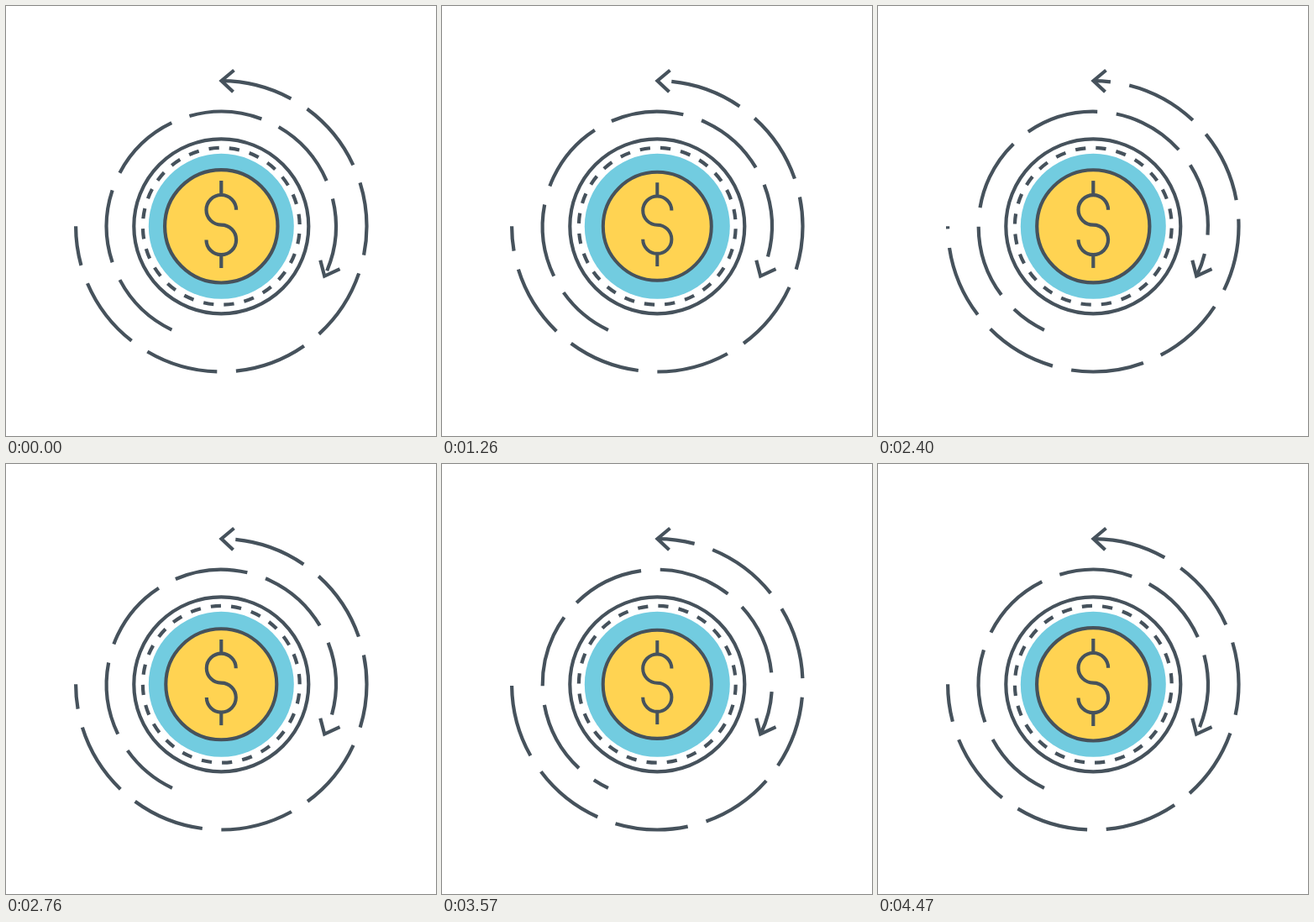
An HTML page with a canvas that plays this animation: 512 px wide and 512 px high, repeating every 4500 ms.

```html
<!DOCTYPE html>
<html lang="en">
<head>
<meta charset="utf-8">
<title>Coin circulation</title>
<style>
  html, body { margin: 0; width: 100%; height: 100%; overflow: hidden; background: #fff; }
  canvas { display: block; width: 100vmin; height: 100vmin; }
</style>
</head>
<body>
<canvas id="stage" width="512" height="512"></canvas>
<script>
const ctx = document.getElementById('stage').getContext('2d');
const LOOP = 4500, STEP = 30, TAU = Math.PI * 2;
const CX = 256.3, CY = 262.3;
const INK = '#46525c', BLUE = '#72cce0', YELLOW = '#ffd352';
const DASH = 87.2, PERIOD = 109.9, ARC_CYCLES = 3;
const RING_RADIUS = 93.4, RING_TICKS = 24, RING_CYCLES = 8;
const rad = degrees => degrees * Math.PI / 180;

function circle(radius, fill, stroked) {
  ctx.beginPath();
  ctx.arc(CX, CY, radius, 0, TAU);
  if (fill) { ctx.fillStyle = fill; ctx.fill(); }
  if (stroked) ctx.stroke();
}

function dashedArc(radius, from, to, reverse, dash, period, shift) {
  ctx.setLineDash([dash, period - dash]);
  ctx.lineDashOffset = -shift;
  ctx.beginPath();
  ctx.arc(CX, CY, radius, rad(from), rad(to), reverse);
  ctx.stroke();
  ctx.setLineDash([]);
}

function polyline(...points) {
  ctx.beginPath();
  for (const [x, y] of points) ctx.lineTo(x, y);
  ctx.stroke();
}

function dollar() {
  const r = 17.8, top = 242.8, bottom = top + 2 * r;
  polyline([CX, 208], [CX, top - r]);
  polyline([CX, bottom + r], [CX, 312]);
  ctx.beginPath();
  ctx.arc(CX, top, r, 0, Math.PI / 2, true);
  ctx.arc(CX, bottom, r, -Math.PI / 2, Math.PI);
  ctx.stroke();
}

function coin(scale) {
  ctx.save();
  ctx.translate(CX, CY);
  ctx.scale(scale, scale);
  ctx.translate(-CX, -CY);
  circle(67.2, YELLOW, true);
  dollar();
  ctx.restore();
}

function tickRing(phase) {
  const tick = TAU * RING_RADIUS / RING_TICKS, dash = tick / 2;
  const start = rad(84.2) * RING_RADIUS - dash / 2;
  dashedArc(RING_RADIUS, 0, 360, false, dash, tick, start - phase * RING_CYCLES * tick);
}

function draw(time) {
  const phase = Math.floor((time % LOOP) / STEP) * STEP / LOOP;
  const travel = phase * ARC_CYCLES * PERIOD;
  ctx.fillStyle = '#fff';
  ctx.fillRect(0, 0, 512, 512);
  ctx.strokeStyle = INK;
  ctx.lineWidth = 4.2;

  dashedArc(173.2, 180, -90, true, DASH, PERIOD, 69.8 + travel);
  polyline([271.5, 76.5], [256.5, 89], [270.5, 102.3]);
  dashedArc(136.6, 115.3, 385.5, false, DASH, PERIOD, 0.6 + travel);
  polyline([374.3, 302.8], [379.2, 321.6], [397.5, 313.2]);

  circle(104, null, true);
  tickRing(phase);
  circle(86.5, BLUE, false);
  coin(0.979 + 0.021 * Math.cos(phase * 2 * TAU));
}

const begin = performance.now();
function play() {
  draw(performance.now() - begin);
  requestAnimationFrame(play);
}
play();
</script>
</body>
</html>
```
